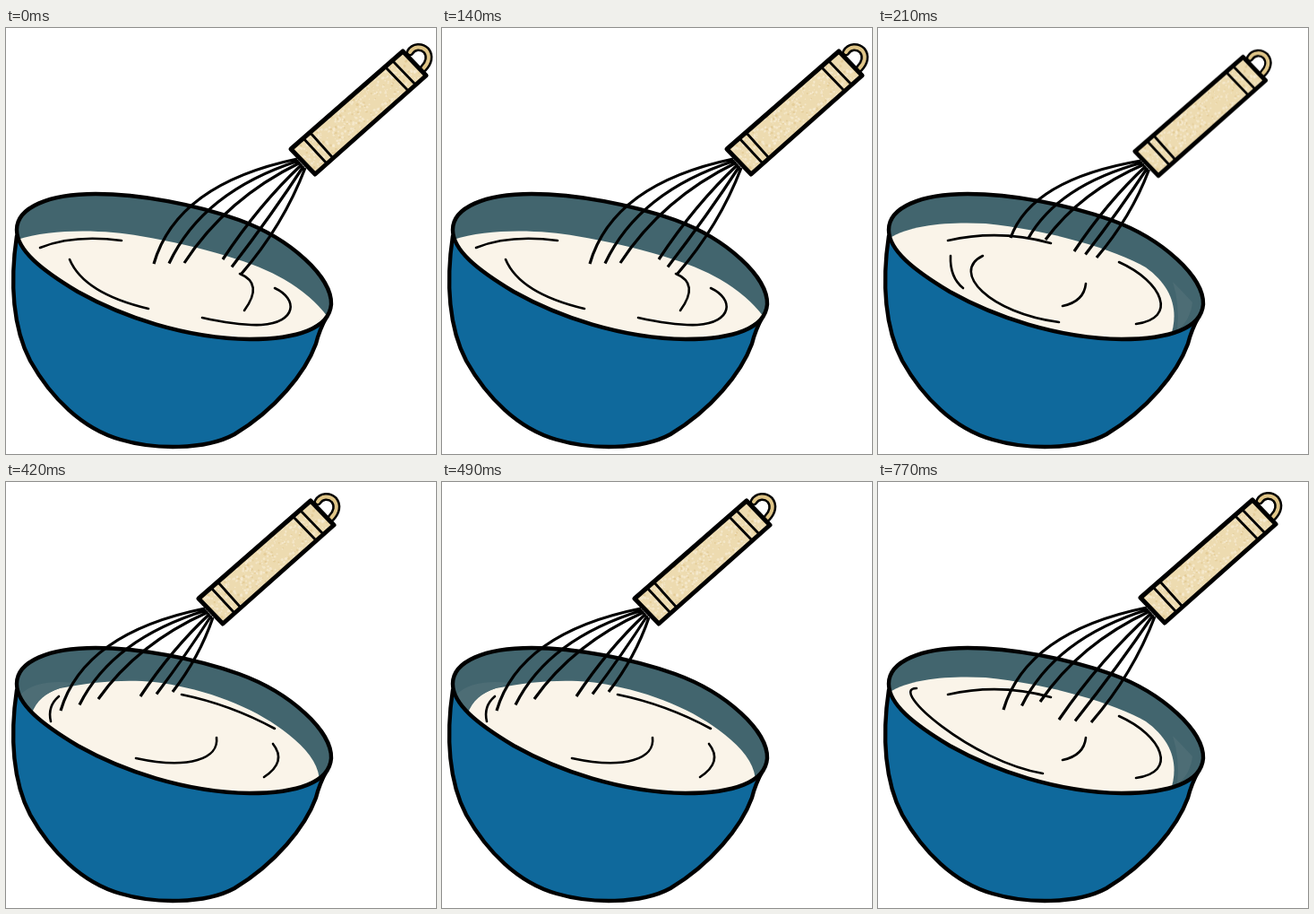
Recreate the animation shown at these times as an HTML page. Size 480x475 px, loop 0.84 s.

```html
<!DOCTYPE html>
<html lang="en">
<head>
<meta charset="utf-8">
<title>Whisking batter</title>
<style>
  html, body { margin: 0; width: 100%; height: 100%; overflow: hidden; background: #fff; }
  svg { display: block; width: 100%; height: 100%; }
  .line { fill: none; stroke: #000; stroke-linecap: round; stroke-linejoin: round; }
  .pose { opacity: 0; animation: show 840ms step-end infinite; }
  @keyframes show { 0% { opacity: 1; } 25%, 100% { opacity: 0; } }
</style>
</head>
<body>
<svg id="stage" viewBox="0 0 480 475">
  <defs>
    <path id="rim" d="M12 225C12 200 48 185 100 185C150 185 212 197 260 214C318 235 364 278 363 308C361 335 325 347 272 347C200 346 130 322 80 294C40 270 12 248 12 225Z"/>
    <path id="bowl" d="M12 232C4 285 8 335 27 371C50 412 85 447 128 459C165 470 222 471 255 453C300 426 334 385 346 352Q350 336 358 322"/>
    <path id="loop" d="M451 27C455 20 464 20 469 25C474 31 472 39 466 45"/>
    <path id="grip" d="M318 135L443 26L469 53L345 163Z"/>
    <clipPath id="inside"><use href="#rim"/></clipPath>
    <g id="handle">
      <use href="#loop" class="line" stroke-width="9"/>
      <use href="#loop" class="line" stroke-width="4" style="stroke:#dfc588"/>
      <use href="#grip" fill="#eddbb0"/>
      <g id="grain"></g>
      <use href="#grip" class="line" stroke-width="5"/>
      <path class="line" stroke-width="2.8" d="M423 43l26 27M431 36l26 27M332 123l26 28M339 116l26 29"/>
    </g>
  </defs>
  <use href="#bowl" fill="#0f699c"/>
  <use href="#bowl" class="line" stroke-width="4.4"/>
  <use href="#rim" fill="#42656e"/>
</svg>
<script>
const stage = document.getElementById('stage');
const POSE_MS = 210, LOOP_MS = 840;
const JOINT = [329, 150];

function add(parent, tag, attrs) {
  const node = document.createElementNS('http://www.w3.org/2000/svg', tag);
  for (const key in attrs) node.setAttribute(key, attrs[key]);
  return parent.appendChild(node);
}

const mix = (a, b, t) => a + (b - a) * t;

// Mottled wood on the handle
let seed = 11;
const random = () => (seed = seed * 16807 % 2147483647) / 2147483647;
const grain = document.getElementById('grain');
for (let i = 0; i < 380; i++) {
  const along = random(), across = random();
  add(grain, 'circle', {
    cx: 322 + 120 * along + 24 * across,
    cy: 135 - 105 * along + 25 * across,
    r: 0.5 + random() * 1.2,
    fill: i % 4 ? '#f8eed8' : '#dfc48c',
    opacity: 0.6
  });
}

// Two bundles of three wires; the bend eases from outward to inward across the whisk
function wirePath(k, shift, left, right) {
  const [x0, y0, x1, y1] = k < 3 ? left : right;
  const t = k % 3 / 2;
  const endX = mix(x0, x1, t), endY = mix(y0, y1, t);
  const x = JOINT[0] + shift[0] - 4 + 1.8 * k;
  const y = JOINT[1] + shift[1] - 4 + 2 * k;
  const bendX = mix(x, endX, 0.84 - 0.1 * k);
  const bendY = mix(y, endY, 0.24 + 0.06 * k);
  return `M${x} ${y}Q${bendX} ${bendY} ${endX} ${endY}`;
}

const sideView = {
  batter: 'M10 236C35 219 80 216 120 218C190 225 265 247 299 267C328 288 337 315 326 346L200 360L0 300Z',
  sheen: 'M329 283Q343 297 351 306Q349 325 334 338Q337 308 329 283Z',
  swirls: 'M78 237Q136 224 193 240M232 285Q230 305 206 310M269 261C318 283 335 324 288 330'
};

// left and right: where the first and last wire of each bundle meet the batter
const poses = [
  {
    batter: 'M10 237C50 223 110 225 150 232C220 244 280 262 310 280Q341 298 359 322L300 360L0 320Z',
    swirls: 'M38 245Q75 230 129 237M71 258Q87 296 159 313M261 274Q288 285 266 315M300 290C326 302 325 328 285 331Q260 332 219 323',
    left: [165, 263, 199, 262], right: [242, 258, 262, 275],
    shift: [0, 0]
  },
  {
    ...sideView,
    swirls: sideView.swirls + 'M81 254Q80 278 95 290M117 254C80 272 125 318 202 328',
    left: [148, 234, 187, 236], right: [219, 249, 244, 256],
    shift: [-31.5, 2], scale: 0.965
  },
  {
    batter: 'M28 260C34 243 45 235 60 230C110 220 155 219 190 227C245 238 290 259 322 287Q350 311 350 335L260 360L90 310Z',
    sheen: 'M16 237Q34 219 76 224L60 230Q35 238 28 258Z',
    swirls: 'M59 239Q46 250 50 267M196 237Q250 248 300 275M235 285C238 308 205 321 145 308M298 292Q314 312 288 329',
    left: [61, 255, 103, 242], right: [150, 239, 186, 234],
    shift: [-103, -5]
  },
  {
    ...sideView,
    swirls: sideView.swirls + 'M43 230C10 230 105 312 184 325',
    left: [140, 254, 181, 245], right: [202, 265, 238, 268],
    shift: [-25, -6]
  }
];

poses.forEach(({ batter, sheen, swirls, left, right, shift, scale = 1 }, i) => {
  const group = add(stage, 'g', { class: 'pose' });
  group.style.animationDelay = `${i * POSE_MS - (i ? LOOP_MS : 0)}ms`;

  const bowl = add(group, 'g', { 'clip-path': 'url(#inside)' });
  add(bowl, 'path', { d: batter, fill: '#faf4e9' });
  if (sheen) add(bowl, 'path', { d: sheen, fill: '#4d6d75' });
  add(group, 'use', { href: '#rim', class: 'line', 'stroke-width': 4.4 });
  add(group, 'path', { d: swirls, class: 'line', 'stroke-width': 2.6 });

  let wires = '';
  for (let k = 0; k < 6; k++) wires += wirePath(k, shift, left, right);
  add(group, 'path', { d: wires, class: 'line', 'stroke-width': 3.2, style: 'stroke-linecap:butt' });

  const [x, y] = JOINT;
  add(group, 'use', {
    href: '#handle',
    transform: `translate(${x + shift[0]} ${y + shift[1]}) scale(${scale}) translate(${-x} ${-y})`
  });
});
</script>
</body>
</html>
```
